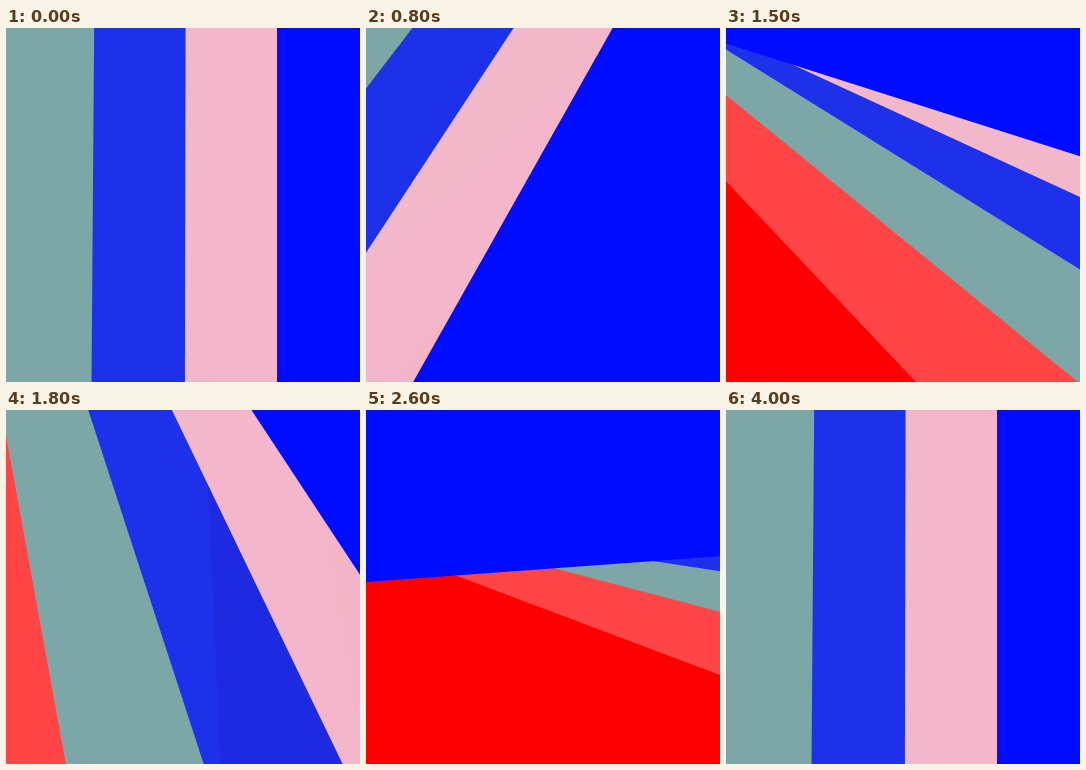
An HTML page with a canvas that plays this animation: 354 by 354 pixels, repeating every 4.1 s.

```html
<!DOCTYPE html>
<html lang="en">
<head>
<meta charset="utf-8">
<title>Turning bands</title>
<style>
  html, body { margin: 0; width: 100%; height: 100%; overflow: hidden; background: #f00; }
  canvas { display: block; width: 354px; height: 354px; }
</style>
</head>
<body>
<canvas id="stage" width="354" height="354"></canvas>
<script>
const ctx = document.getElementById('stage').getContext('2d');

const LOOP = 4100, TURN = 4000, STEP = 100;
const LEAD = 50;                         // ms each lower band runs ahead
const BAND = { w: 292.6, h: 1300, x: 417.3, y: -5, gap: 91.4 };
const SLIP = [0, -1, -1, 1];             // uneven cadence, in 1/60 s

// Bottom to top; the lower bands are translucent
const colors = [
  'rgba(255, 255, 255, .27)',
  'rgba(10, 255, 255, .53)',
  'rgba(0, 12, 255, .76)',
  'rgba(250, 187, 202, .97)',
  'rgb(0, 12, 255)'
];

// cubic-bezier(.42, 0, .58, 1)
function easeInOut(x) {
  let s = x;
  for (let i = 0; i < 6; i++) {
    const err = s * (1.26 + s * (-0.78 + s * 0.52)) - x;
    s -= err / (1.26 + s * (-1.56 + s * 1.56));
  }
  return s * s * (3 - 2 * s);
}

function draw(ms) {
  const n = Math.floor((ms % LOOP) / STEP);
  const t = n * STEP + SLIP[n % 4] * 1000 / 60;

  ctx.setTransform(1, 0, 0, 1, 0, 0);
  ctx.fillStyle = '#f00';
  ctx.fillRect(0, 0, 354, 354);

  colors.forEach((color, i) => {
    const below = colors.length - 1 - i;
    const phase = (t + below * LEAD + TURN) % TURN / TURN;
    ctx.setTransform(1, 0, 0, 1, BAND.x - below * BAND.gap, BAND.y);
    ctx.rotate(easeInOut(phase) * 2 * Math.PI);
    ctx.fillStyle = color;
    ctx.fillRect(-BAND.w / 2, -BAND.h / 2, BAND.w, BAND.h);
  });
}

const start = performance.now();
function tick() {
  draw(performance.now() - start);
  requestAnimationFrame(tick);
}
tick();
</script>
</body>
</html>
```
